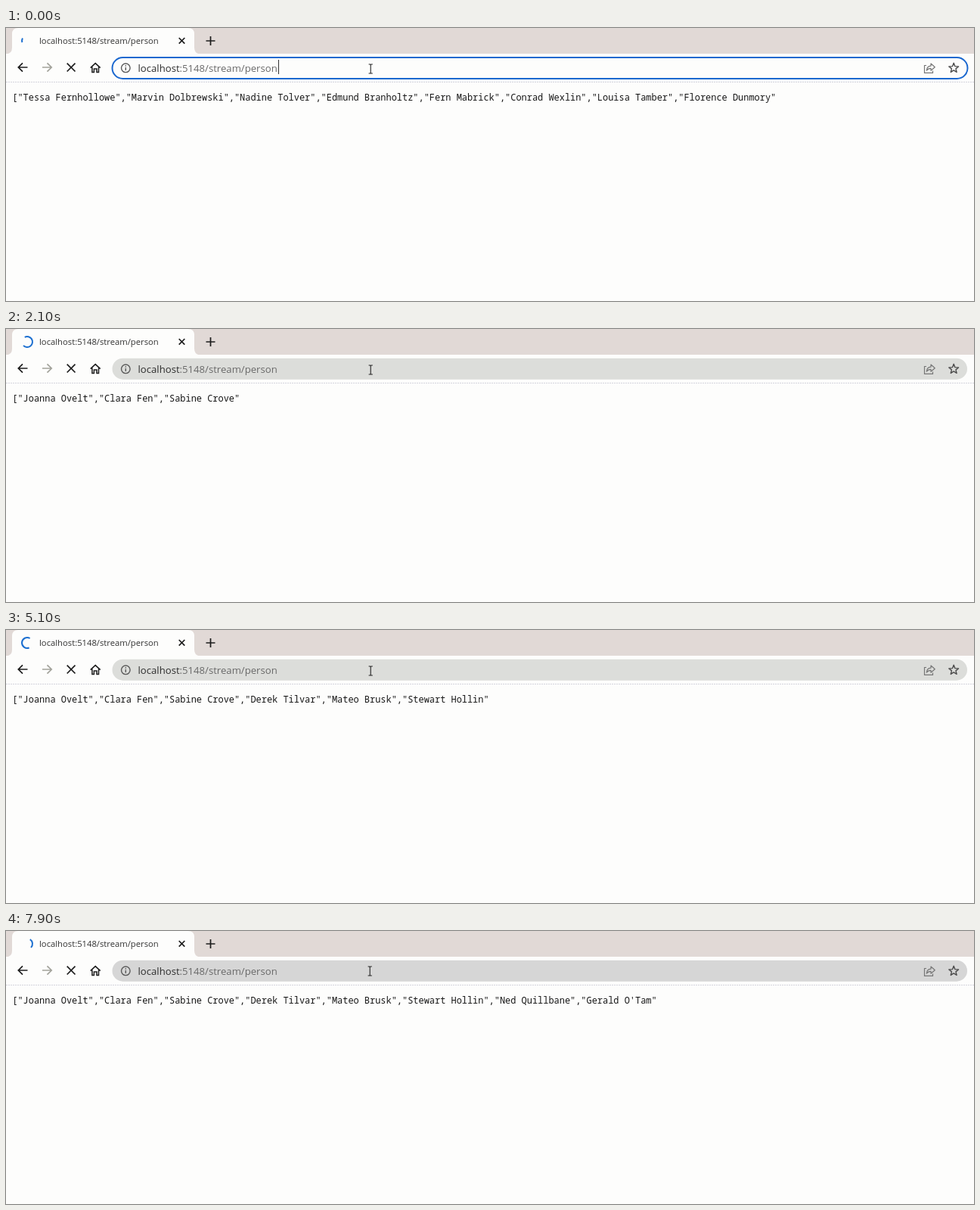
These frames come from a looping animation (1280x361 px, 8 s). An HTML page:

```html
<!DOCTYPE html>
<html lang="en">
<head>
<meta charset="utf-8">
<title>Streaming response</title>
<style>
html, body { margin: 0; width: 100%; height: 100%; overflow: hidden; background: #fdfdfc; }
svg { display: block; width: 100%; height: 100%; }
.ui { font-family: "Open Sans", "Noto Sans", sans-serif; }
.mono { font-family: "Noto Sans Mono", "DejaVu Sans Mono", monospace; font-size: 11.945px; fill: #161616; }
.line { fill: none; stroke-width: 1.7; }
</style>
</head>
<body>
<svg viewBox="0 0 1280 361" preserveAspectRatio="none">
  <rect width="1280" height="361" fill="#fdfdfc"/>

  <!-- tab strip -->
  <rect width="1280" height="34" fill="#e1d9d6"/>
  <path d="M0 34.5Q8 34 8 26V8Q8 0 16 0H241Q249 0 249 8V26Q249 34 257 34.5Z" fill="#fdfdfc"/>
  <path id="spinner" fill="none" stroke="#1c6fd0" stroke-width="2"/>
  <text class="ui" x="44" y="21" font-size="11.25" fill="#333">localhost:5148/stream/person</text>
  <path class="line" stroke="#1c1c1c" d="M228.7 13l7.6 7.6M236.3 13l-7.6 7.6"/>
  <path class="line" stroke="#1c1c1c" stroke-width="1.9" d="M264.5 17h12M270.5 11v12"/>

  <!-- toolbar -->
  <g class="line" stroke="#1c1c1c">
    <path d="M28.5 52H16.5M22 46.3L16.3 52L22 57.7"/>
    <path d="M48 52H60M54.5 46.3L60.2 52L54.5 57.7" stroke="#a3a39b"/>
    <path d="M80.7 46.7l10.8 10.8M91.5 46.7l-10.8 10.8"/>
    <path d="M111.7 52.6L118.2 46.6L124.7 52.6M113.9 51.4V58.4H116.4V54H120V58.4H122.5V51.4" stroke-width="1.5"/>
  </g>
  <rect id="pill" height="28"/>
  <g fill="none" stroke="#5a5a5a" stroke-width="1.4">
    <circle cx="158.3" cy="52.8" r="5.8"/>
    <path d="M158.3 52v4M158.3 49.3v1.5"/>
    <path d="M1217 49.5H1214.5V59.3H1225.5V56.5" stroke="#777" stroke-width="1.2"/>
    <path d="M1217.3 56.2Q1217.8 50.4 1223 50.2V47L1228.3 51.7L1223 56.2V53.4Q1219.4 53.3 1217.3 56.2Z" stroke="#777" stroke-width="1.2" stroke-linejoin="round"/>
    <path id="star" stroke="#4c4c4c" stroke-linejoin="round"/>
  </g>
  <text class="ui" x="174.5" y="57.6" font-size="13.15" fill="#2e2e2e">localhost<tspan fill="#696969">:5148/stream/person</tspan></text>
  <path id="caret" d="M360.5 42V61" stroke="#333" stroke-width="1"/>
  <path id="mouse" fill="none" stroke="#222" stroke-width="1.1" d="M-2.6 -6H-.7L0 -5.4L.7 -6H2.6M0 -5.4V5.4M-2.6 6H-.7L0 5.4L.7 6H2.6"/>
  <path d="M0 71.5H1280" stroke="#d3d3dc" stroke-width="1" stroke-dasharray="2 1"/>

  <text id="body" class="mono" x="8.3" y="96.4"></text>
</svg>
<script>
const LOOP = 8000, STEP = 100;
const before = ["Tessa Fernhollowe", "Marvin Dolbrewski", "Nadine Tolver", "Edmund Branholtz",
  "Fern Mabrick", "Conrad Wexlin", "Louisa Tamber", "Florence Dunmory"];
const after = ["Joanna Ovelt", "Clara Fen", "Sabine Crove", "Derek Tilvar",
  "Mateo Brusk", "Stewart Hollin", "Ned Quillbane", "Gerald O'Tam"];

const el = id => document.getElementById(id);
const set = (id, attrs) => { for (const k in attrs) el(id).setAttribute(k, attrs[k]); };
const polar = (cx, cy, r, deg) => {
  const a = deg * Math.PI / 180;
  return (cx + r * Math.cos(a)).toFixed(2) + " " + (cy + r * Math.sin(a)).toFixed(2);
};

set("star", { d: "M" + Array.from({ length: 10 }, (_, i) =>
  polar(1253.2, 53, i % 2 ? 2.9 : 6.7, i * 36 - 90)).join("L") + "Z" });

// cubic-bezier(.4, 0, .2, 1)
function ease(x) {
  let lo = 0, hi = 1;
  for (let i = 0; i < 24; i++) {
    const u = (lo + hi) / 2, v = 1 - u;
    if (1.2 * v * v * u + .6 * v * u * u + u * u * u < x) lo = u; else hi = u;
  }
  return lo * lo * (3 - 2 * lo);
}

// Arc shrinks towards its head, then grows from its tail, while the whole turns
function spinnerPath(t) {
  const ARC = 666, MAX = 270, TURN = 1568;
  const e = t - 970;
  const cycle = Math.floor(e / (2 * ARC));
  const phase = e - cycle * 2 * ARC;
  const shrinking = phase < ARC;
  let sweep = MAX * ease(phase % ARC / ARC);
  if (shrinking) sweep = MAX - sweep;
  sweep = Math.max(5, sweep);
  const anchor = 57 + 360 * (t - 900) / TURN + MAX * (cycle + 1);
  const from = shrinking ? anchor - sweep : anchor;
  const at = deg => polar(28, 17, 7, deg);
  return `M${at(from)}A7 7 0 ${sweep > 180 ? 1 : 0} 1 ${at(from + sweep)}`;
}

// One more name each second; the old page stays until the second one is in
function names(t) {
  return t < 1100 ? before : after.slice(0, Math.floor((t - 100) / 1000) + 1);
}

function draw(time) {
  const t = Math.floor(time % LOOP / STEP) * STEP;
  const focused = t < 100, hover = t >= 7900;
  set("spinner", { d: spinnerPath(t) });
  set("pill", focused
    ? { x: 140.5, y: 39, width: 1131, rx: 14, fill: "#fdfdfc", stroke: "#1b68cf", "stroke-width": 2 }
    : { x: 140.5, y: 38.7, width: 1130.5, rx: 14, fill: hover ? "#d6d6d6" : "#dcddda", stroke: "none" });
  set("caret", { visibility: focused ? "visible" : "hidden" });
  set("mouse", { transform: hover ? "translate(481.2 53)" : "translate(482.2 54)" });
  const text = "[" + names(t).map(n => `"${n}"`).join(",");
  if (el("body").textContent !== text) el("body").textContent = text;
}

const start = performance.now();
function tick() {
  draw(performance.now() - start);
  requestAnimationFrame(tick);
}
draw(0);
requestAnimationFrame(tick);
</script>
</body>
</html>
```
